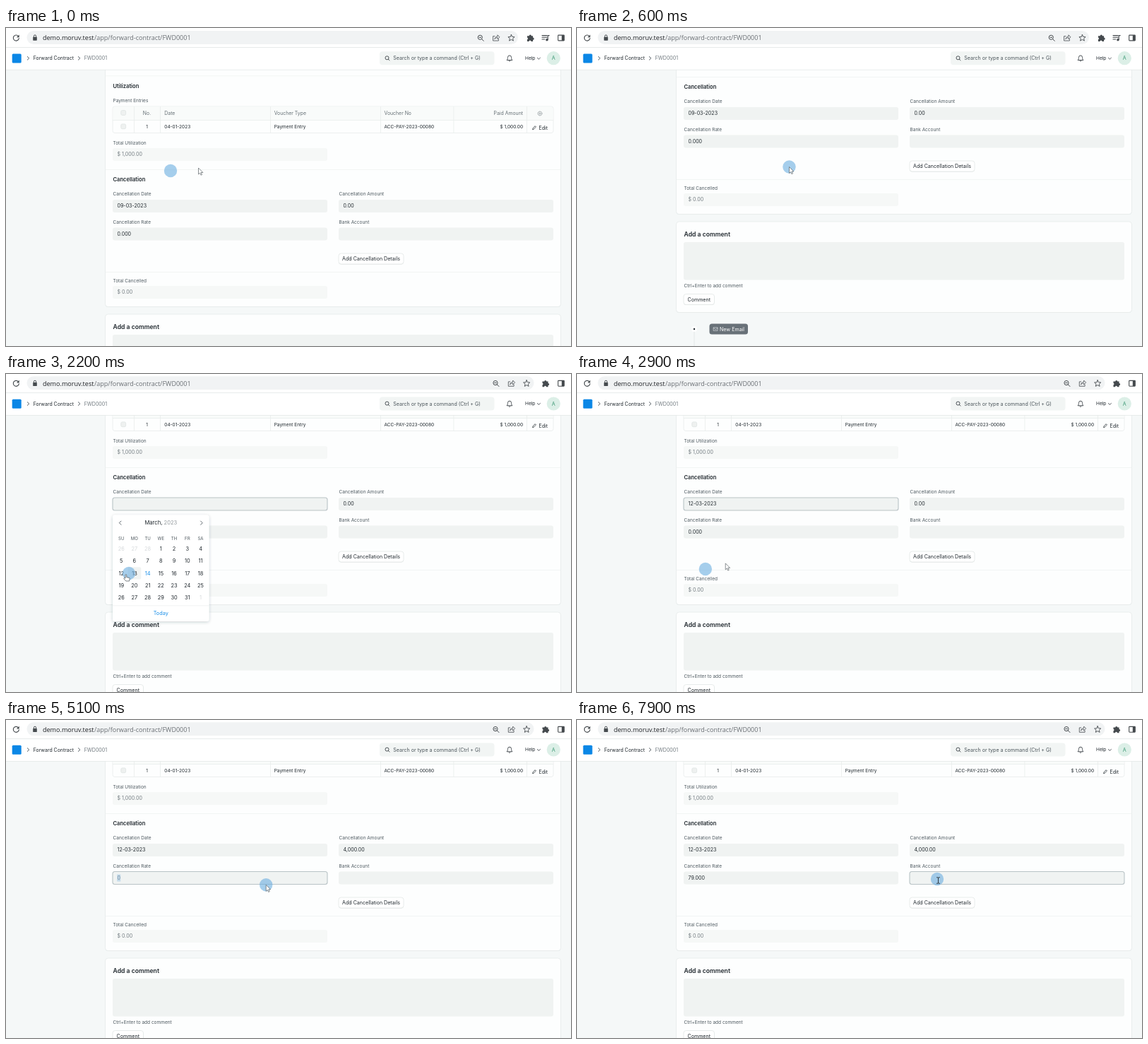
These frames come from a looping animation (800x450 px, 8000 ms). An HTML page:

```html
<!DOCTYPE html>
<html lang="en">
<head>
<meta charset="utf-8">
<title>Forward contract form</title>
<style>
html, body { margin: 0; width: 100%; height: 100%; overflow: hidden; background: #fff; }
svg { display: block; width: 100vw; height: 100vh; }
text { font-family: Inter, sans-serif; white-space: pre; }
.url text { font-family: "Open Sans", sans-serif; }
</style>
</head>
<body>
<svg id="stage" viewBox="0 0 800 450"></svg>
<script>
const LOOP = 8000, STEP = 100;
const INK = '#20282e', LABEL = '#4d585f', MUTED = '#727b80', BLUE = '#1a8fe8', LINE = '#e9edec';
const stage = document.getElementById('stage');

// Text is placed by the vertical middle of its capitals.
function text(x, mid, s, size = 7.1, fill = INK, o = {}) {
  return `<text x="${x}" y="${(mid + size * .36).toFixed(2)}" font-size="${size}" fill="${fill}"` +
    ` font-weight="${o.weight || 400}" text-anchor="${o.anchor || 'start'}"${o.id ? ` id="${o.id}"` : ''}>${s}</text>`;
}
function rect(x, y, w, h, fill, r = 0, extra = '') {
  return `<rect x="${x}" y="${y}" width="${w}" height="${h}" fill="${fill}" rx="${r}" ${extra}/>`;
}
function stroke(d, color = '#4b555b', w = .8, extra = '') {
  return `<path d="${d}" fill="none" stroke="${color}" stroke-width="${w}" stroke-linecap="round" stroke-linejoin="round" ${extra}/>`;
}
const at = (x, y, s, id = '') => `<g transform="translate(${x} ${y})"${id && ` id="${id}"`}>${s}</g>`;
const border = c => `stroke="${c}" stroke-width=".8"`;
const rule = y => rect(141, y, 644, .8, '#f0f3f2');
const label = (x, y, s) => text(x + .5, y, s, 6.5, LABEL);

const FIELDS = {
  util: [151, 170], date: [151, 243], amount: [471, 243],
  rate: [151, 282.5], bank: [471, 282.5], total: [151, 365]
};
function field(id, value, readOnly) {
  const [x, y] = FIELDS[id];
  return rect(x, y, 304, 18, readOnly ? '#f6f8f7' : '#f0f3f2', 3) +
    text(x + 6.5, y + 8.8, value, 7.1, readOnly ? MUTED : INK, { id });
}
function button(x, y, w, s) {
  return rect(x, y + .6, w, 15, '#dde2e1', 3.5) + rect(x, y, w, 15, '#fff', 3.5, border('#e2e7e6')) +
    text(x + w / 2, y + 7.5, s, 7.1, INK, { anchor: 'middle' });
}
const card = (y, h) => rect(140.5, y + .5, 645, h, '#e3e8e7', 4) +
  rect(140.5, y, 645, h, '#fdfefe', 4, border('#e6ebea'));
const check = y => rect(162.8, y - 3.4, 6.8, 6.8, '#eef1f0', 1.8, border('#dfe4e3'));

function table() {
  const cols = [181, 218, 374, 530, 633.5, 737];
  const end = { anchor: 'end' }, mid = { anchor: 'middle' };
  const head = (x, s, o) => text(x, 120.5, s, 6.9, '#667076', o);
  const cell = (x, s, o) => text(x, 139.4, s, 6.5, INK, o);
  return rect(151, 111, 624, 37.5, '#fdfefe', 3, border(LINE)) +
    rect(151.4, 111.4, 623.2, 18.6, '#f9fbfa', 3) + rect(151, 130, 624, .8, LINE) +
    cols.map(x => rect(x, 111, .8, 37.5, LINE)).join('') +
    check(120) + check(139.3) +
    head(199.5, 'No.', mid) + head(224.3, 'Date') + head(379.7, 'Voucher Type') +
    head(535.5, 'Voucher No') + head(732, 'Paid Amount', end) +
    cell(199.5, '1', mid) + cell(224.3, '04-01-2023') + cell(379.7, 'Payment Entry') +
    cell(535.5, 'ACC-PAY-2023-00080') + cell(732, '$ 1,000.00', end) +
    at(756, 121, `<circle r="2.9" fill="none" stroke="#778085" stroke-width=".8" stroke-dasharray="1.7 .6"/>` +
      `<circle r="1.1" fill="none" stroke="#778085" stroke-width=".6"/>`) +
    at(748, 141, stroke('M-2.3 2.4L-1.8 .6L1.2 -2.3L2.5 -1L-.5 1.9Z', INK, .75)) +
    text(754.5, 141, 'Edit', 7);
}

function page() {
  return card(30, 364.5) + rule(67.5) +
    text(151.5, 82, 'Utilization', 7.6, INK, { weight: 600 }) +
    label(151, 102.7, 'Payment Entries') + table() +
    label(151, 162.7, 'Total Utilization') + field('util', '$ 1,000.00', true) +
    rule(200) + text(151.5, 214.2, 'Cancellation', 7.6, INK, { weight: 600 }) +
    label(151, 235, 'Cancellation Date') + field('date', '') +
    label(471, 235, 'Cancellation Amount') + field('amount', '') +
    label(151, 274.7, 'Cancellation Rate') + field('rate', '') +
    label(471, 274.7, 'Bank Account') + field('bank', '') +
    button(471, 319, 92, 'Add Cancellation Details') +
    rule(345) + label(151, 357.5, 'Total Cancelled') + field('total', '$ 0.00', true) +
    rect(0, 0, 304, 18, '#cbdff0', 3, 'id="focus" fill-opacity="0" stroke="#b9c3c6" stroke-width="1.1"') +
    rect(157.2, 286.5, 5, 10, '#a9cbe6', 0, 'id="picked" opacity=".6"') +
    rect(477.3, 286.5, .7, 10, INK, 0, 'id="caret"') +
    card(405, 128.5) + text(151.5, 422.7, 'Add a comment', 8.65, INK, { weight: 600 }) +
    rect(151, 434, 624, 53.5, '#f0f3f2', 3) +
    label(151, 495.6, 'Ctrl+Enter to add comment') + button(151, 507.5, 43.5, 'Comment') +
    rect(165.6, 560, .8, 60, '#dfe4e4') +
    `<circle cx="166" cy="557" r="4" fill="#fff"/><circle cx="166" cy="557" r="1.2" fill="${INK}"/>` +
    rect(187.5, 549.5, 54.5, 15, '#687178', 3.5) +
    at(196.3, 557, stroke('M-2.8 -2.2H2.8V2.3H-2.8ZM-2.8 -1.2L0 .6L2.8 -1.2', '#dfe3e5', .65)) +
    text(202, 557, 'New Email', 7.1, '#fff');
}

const chevron = (x, y) => stroke(`M${x - 1.2} ${y - 2.3}L${x + 1.2} ${y}L${x - 1.2} ${y + 2.3}`, '#39434a', .9);
const DAY = { x: 163.2, y: 247.3, dx: 18.72, dy: 17.35 };

function calendar() {
  const mid = { anchor: 'middle' };
  let s = rect(151, 199.5, 136.5, 150.5, '#fff', 3.5, 'filter="url(#soft)"') +
    rect(0, 0, 18.7, 17.2, '#f0f3f2', 2, 'id="hover"') +
    stroke('M163 208.1L160.4 210.7L163 213.3M275.6 208.1L278.2 210.7L275.6 213.3', '#4f595f', .9) +
    text(196.5, 210.5, 'March, <tspan fill="#93999d">2023</tspan>', 7.6);
  'SU MO TU WE TH FR SA'.split(' ').forEach((d, i) => {
    s += text(DAY.x + i * DAY.dx, 232.3, d, 6.1, '#4f595f', mid);
  });
  for (let i = 0; i < 35; i++) {
    const n = i < 3 ? 26 + i : i > 33 ? 1 : i - 2;
    const color = i < 3 || i > 33 ? '#d5d9db' : n === 14 ? BLUE : INK;
    s += text(DAY.x + i % 7 * DAY.dx, DAY.y + Math.floor(i / 7) * DAY.dy, n, 7.4, color, mid);
  }
  return s + rect(151, 327.5, 136.5, .8, '#edf0f0') + text(219.2, 338.8, 'Today', 7.3, BLUE, mid);
}

function chrome() {
  const c = '#454a4e';
  const tools =
    at(672, 14, `<circle cx="-.7" cy="-.7" r="3.1" fill="none" stroke="${c}"/>` + stroke('M1.6 1.6L4.3 4.3M-2 -.7H.6', c, 1)) +
    at(694, 14, stroke('M-2 -2.4H-4.4V4H3.4V1.8M-2 1.3C-1.5 -1.3 .5 -2 2 -2V-4.2L5 -1.2L2 1.7V-.3C.2 -.3 -1 .1 -2 1.3Z', c, .8)) +
    at(715.5, 14, stroke('M0 -4.6L1.3 -1.6L4.6 -1.3L2.1 .9L2.9 4.1L0 2.4L-2.9 4.1L-2.1 .9L-4.6 -1.3L-1.3 -1.6Z', c, .9));
  const puzzle = `<path d="M-4.5 -2.8H-1.8A1.6 1.6 0 1 1 1.4 -2.8H3.6V-.4A1.6 1.6 0 1 1 3.6 2.8V5H1A1.5 1.5 0 0 0 -2 5H-4.5V2.3A1.5 1.5 0 0 0 -4.5 -.5Z" fill="${c}"/>`;
  return rect(0, -2, 800, 61, '#fff') +
    rect(29.5, 4, 695.5, 19, '#f1f3f4', 9.5, 'id="bar"') + rect(0, 27, 800, .8, '#e1e5e5') +
    at(14.3, 14, stroke('M3.2 -2.4A4 4 0 1 0 4 .6', c, 1.1) + `<path d="M4.4 -4.6V-.8H.6Z" fill="${c}"/>`) +
    at(41, 14, rect(-2.8, -1.2, 5.6, 5, c, .7) + stroke('M-1.6 -1.2V-2.5A1.6 1.6 0 0 1 1.6 -2.5V-1.2', c, 1)) +
    `<g class="url">${text(52, 14, 'demo.moruv.test', 9.05, '#202327')}${text(125, 14, '/app/forward-contract/FWD0001', 9, '#6a6f74')}</g>` +
    at(0, 0, tools, 'tools') + at(742.5, 14, puzzle, 'puzzle') +
    at(764, 14, stroke('M-5 -3.4H2M-5 -.7H2M-5 2H-1.2M3.2 2.6V-3.4H5.2', c, 1.1) + `<circle cx="1.9" cy="2.7" r="1.7" fill="${c}"/>`, 'queue') +
    at(786, 14, rect(-4.3, -3.9, 8.6, 7.8, 'none', .6, `stroke="${c}" stroke-width="1.1"`) + rect(.8, -3.9, 3.5, 7.8, c)) +
    rect(8.7, 36.4, 13, 13, '#0b87e6', 1.5) +
    chevron(31.5, 42.8) + text(38.7, 42.8, 'Forward Contract', 6.95) +
    chevron(103.6, 42.8) + text(110.7, 42.8, 'FWD0001', 7.05, MUTED) +
    rect(529, 33.2, 162.5, 19, '#f2f5f4', 4) +
    at(540, 42.8, `<circle cx="-.5" cy="-.5" r="2.5" fill="none" stroke="${INK}" stroke-width=".8"/>` + stroke('M1.4 1.4L3 3', INK)) +
    text(548.2, 42.8, 'Search or type a command (Ctrl + G)', 7.1, '#4a545a') +
    at(713, 43, stroke('M-3.6 2.2C-2.4 1 -2.8 -.3 -2.5 -1.6A2.5 2.5 0 0 1 2.5 -1.6C2.8 -.3 2.4 1 3.6 2.2ZM-.9 3.6A1 1 0 0 0 .9 3.6', INK)) +
    text(735, 42.8, 'Help', 6.6) + stroke('M752.4 42.2L754.4 44.1L756.4 42.2', INK, .8) +
    `<circle cx="775.3" cy="42.7" r="9.6" fill="#dcefe7"/>` +
    text(775.3, 42.8, 'A', 7.2, '#3f9a76', { anchor: 'middle' }) +
    rect(0, 58.8, 800, .8, '#e4e9e8');
}

const POINTERS = {
  arrow: '<path d="M0 0V9L2.1 7.1L3.5 10.2L5 9.5L3.6 6.5H6.4Z" fill="#fff" stroke="#5a6065" stroke-width=".7" stroke-linejoin="round"/>',
  beam: stroke('M-2 -4.2H-.6L0 -3.7L.6 -4.2H2M0 -3.7V3.7M-2 4.2H-.6L0 3.7L.6 4.2H2', '#22282c', .9),
  hand: '<path d="M-1 .6A.9 .9 0 0 1 .8 .6V3.6L4.4 4.4A1.2 1.2 0 0 1 5.2 5.6L4.6 9H-.2L-3 5.8A.9 .9 0 0 1 -1.7 4.6L-1 5.2Z" fill="#fff" stroke="#464c51" stroke-width=".7" stroke-linejoin="round"/>'
};

stage.innerHTML =
  `<defs><filter id="soft" x="-10%" y="-10%" width="120%" height="120%"><feDropShadow dx="0" dy="1.2" stdDeviation="2" flood-color="#2a3a40" flood-opacity=".22"/></filter></defs>` +
  rect(0, 0, 800, 450, '#f5f8f8') +
  `<g id="page">${page()}</g><g id="calendar">${calendar()}</g><g id="chrome">${chrome()}</g>` +
  `<circle id="halo" r="9.2" fill="#6aaee0" opacity=".6"/><g id="pointer"></g>`;

const el = {};
stage.querySelectorAll('[id]').forEach(n => el[n.id] = n);

// Pointer hot spot: time, x, y.
const PATH = [
  [-60, 233, 202], [0, 272.5, 198], [150, 300.5, 196.5], [700, 300.5, 196.5],
  [900, 300, 183], [1050, 301, 171], [1140, 300, 173], [1200, 298, 183],
  [1500, 262, 222], [1900, 196, 276], [2140, 174, 282], [2200, 170, 284], [2350, 164, 282],
  [2750, 164, 281], [3400, 506, 184], [3540, 512, 187], [3600, 513.5, 189],
  [4200, 513.5, 189], [4700, 362, 227], [5040, 368.2, 233.3], [6050, 368.2, 233.3],
  [6450, 440, 242], [6850, 505, 227], [7000, 508, 225], [7840, 510, 225], [7900, 511.5, 227]
];
const SCROLL = [[100, 0], [500, 131], [650, 131], [900, 68]];
const LAG = 60;

function along(keys, t) {
  let i = keys.findIndex(k => k[0] > t);
  if (i < 0) return keys[keys.length - 1].slice(1);
  if (i === 0) return keys[0].slice(1);
  const a = keys[i - 1], b = keys[i];
  let p = (t - a[0]) / (b[0] - a[0]);
  if (b[0] - a[0] > 300) p = p * p * (3 - 2 * p);
  return a.slice(1).map((v, j) => v + (b[j + 1] - v) * p);
}
// Last value whose start time has passed.
const since = (steps, t) => steps.filter(s => s[0] <= t).pop()[1];

const FOCUS = [[0, ''], [1000, 'date'], [3500, 'amount'], [4700, 'rate'], [7200, 'bank']];
const VALUES = {
  date: [[0, '09-03-2023'], [1100, ''], [2500, '12-03-2023']],
  amount: [[0, '0.00'], [3500, '0'], [4000, '4'], [4100, '40'], [4200, '400'], [4300, '4000'], [4700, '4,000.00']],
  rate: [[0, '0.000'], [4700, '0'], [5500, '7'], [5800, '79'], [7200, '79.000']]
};
const move = (n, x, y) => n.setAttribute('transform', `translate(${x.toFixed(2)} ${y.toFixed(2)})`);
const show = (n, on) => n.setAttribute('display', on ? 'inline' : 'none');

function draw(t) {
  const [scroll] = along(SCROLL, t);
  const late = t >= 800;
  move(el.page, 0, -scroll);
  move(el.chrome, 0, late ? -.7 : 0);
  move(el.tools, late ? 21.7 : 0, 0);
  move(el.puzzle, late ? 764 : 742.5, 14);
  show(el.queue, !late);
  el.bar.setAttribute('width', late ? 718 : 695.5);

  for (const id in VALUES) el[id].textContent = since(VALUES[id], t);
  const focus = since(FOCUS, t);
  show(el.focus, focus);
  if (focus) move(el.focus, ...FIELDS[focus]);
  show(el.picked, t >= 4800 && t < 5500);
  show(el.caret, t >= 7300 && t < 7800);

  const open = t >= 1100 && t < 2500;
  const [x, y] = along(PATH, t), [hx, hy] = along(PATH, t - LAG);
  show(el.calendar, open);
  const col = Math.floor((hx - DAY.x) / DAY.dx + .5), row = Math.floor((hy - DAY.y) / DAY.dy + .5);
  show(el.hover, col >= 0 && col < 7 && row >= 0 && row < 5);
  move(el.hover, DAY.x + (col - .5) * DAY.dx, DAY.y + (row - .5) * DAY.dy);

  const inField = Object.values(FIELDS).some(([fx, fy]) =>
    x > fx && x < fx + 304 && y > fy - scroll && y < fy - scroll + 18);
  const overDays = open && x > 151 && x < 287 && y > 199;
  el.pointer.innerHTML = POINTERS[overDays ? (y > 239 ? 'hand' : 'arrow') : inField ? 'beam' : 'arrow'];
  move(el.pointer, x, y);
  move(el.halo, hx, hy);
}

const start = performance.now();
function tick() {
  const t = (performance.now() - start) % LOOP;
  draw(Math.floor(t / STEP) * STEP);
  requestAnimationFrame(tick);
}
tick();
</script>
</body>
</html>
```
